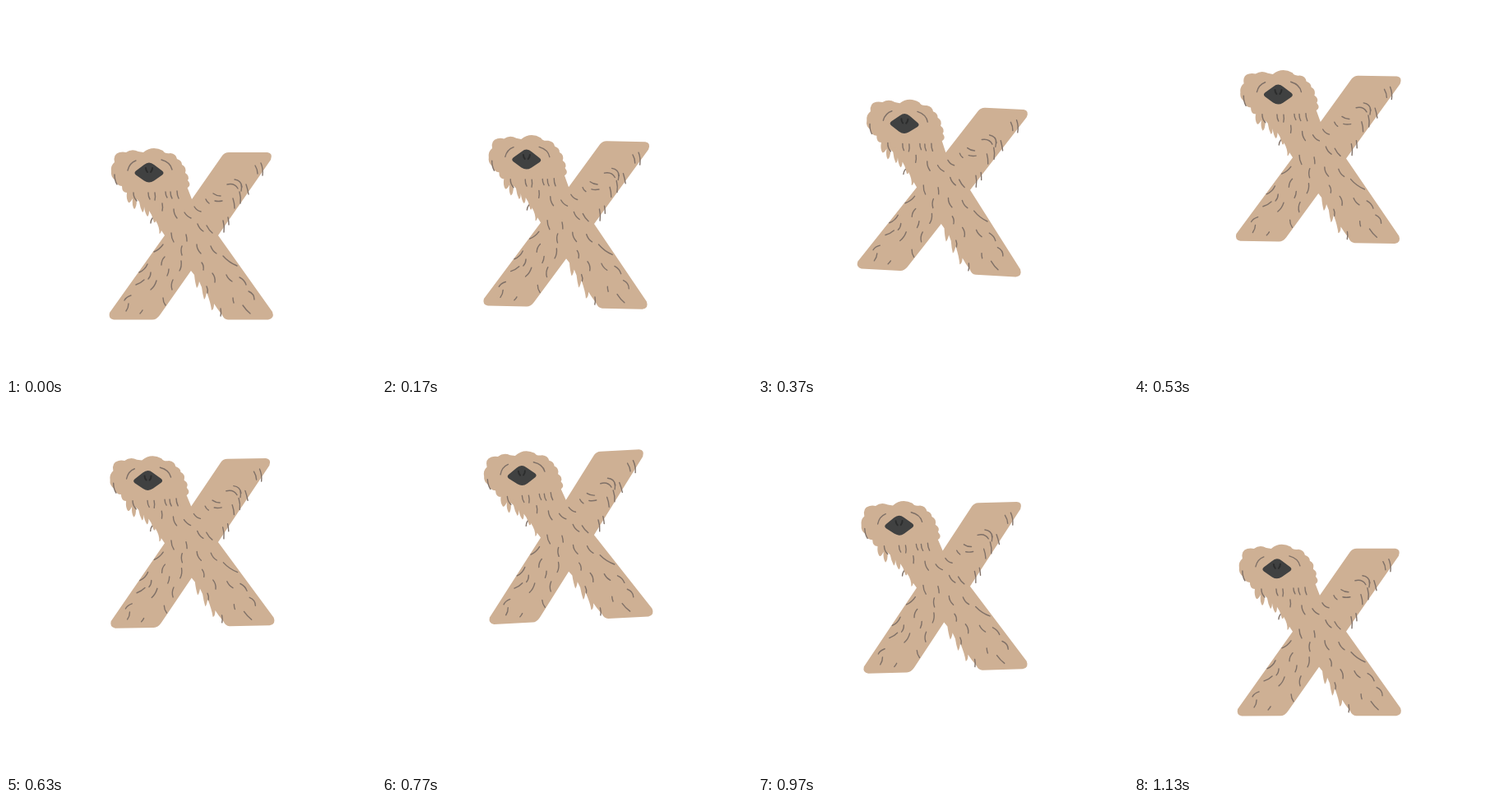
Animation, 450 px wide and 450 px high, one loop 1.16 s. Source, as an HTML page:

```html
<!DOCTYPE html>
<html lang="en">
<head>
<meta charset="utf-8">
<title>Furry X</title>
<style>
  html, body { margin: 0; height: 100%; overflow: hidden; background: #fff; }
  svg { display: block; width: 100%; height: 100%; }
  .fur { fill: none; stroke: #7f7067; stroke-width: 1.4; stroke-linecap: round; }
</style>
</head>
<body>
<svg viewBox="0 0 450 450">
  <g id="letter">
    <g fill="#ceb094">
      <!-- arm, legs and shaggy edges -->
      <path d="M226 235L263 182Q266 178 271 178H318Q325 179 322 187L258 279L324 372Q327 380 319 381.500H270Q265 381 263 376
        L257 368L253 362Q253 369 250 370Q249 361 244 348Q243 355 241 357Q239 350 238 342L235 335Q234 341 232 343
        Q230 337 229 327L225 322L187 376Q183 381.500 178 381.500H131Q124 380 126 373L193 279
        L189 273Q188 277 186.500 277Q187 269 182 261Q182 264 180 263L177 254L174 249Q174 255 172 256Q169 252 168 244Q168 250 166 251
        Q163 245 162 238L159 235Q159 245 156 247Q153 243 154 234Q151 240 149 239Q146 235 147 227L210 215L221 222Z"/>
      <!-- head -->
      <path d="M147 227Q141 227 141 219Q135 219 133 212Q127 208 128 201Q127 194 132 190Q130 180 138 178Q142 177 146 178
        Q153 173 161 177L167 178Q178 169 191 176Q193 180 200 179Q207 180 208 186Q214 188 214 193Q220 196 218 203
        Q224 207 221 212Q226 218 221 221Q219 227 210 228L180 238Z"/>
    </g>
    <g class="fur">
      <path d="M148 200q2-9 10-12M189 187q11 3 13 12M132 205q0 7 3 12M155 227q0 6 4 10M173 227q0 5 2 8M181 227q1 5 0 9
        M190 240q1 5 0 9M194 226q0 4 2 7M200 226q0 5 2 8M208 225q0 5 2 9M204 247q0 6 4 11M176 264q0-3 2-6"/>
      <path d="M217 251q3 5 8 7M229 244q3 5 8 6M243 235q1 3 4 5M233 265q2 6 7 9M244 267q3 6 7 9M201 276q0 6 3 11M219 278q1 4 1 8
        M252 228q4 3 9 3M254 237q4 1 9 0"/>
      <path d="M269 217q9-2 13 5M278 211q8 1 9 9M286 217q1 4 0 8M292 217q2 6 3 12M303 194q3 5 3 10M310 191q3 7 2 15
        M284 226q2 7 1 14M276 234q2 6 2 12M264 261q2 7 1 14M270 257q1 5 1 9"/>
      <path d="M191 290q-4 6-11 9M214 292q-2 5 0 11M193 305q-4 4-4 10M198 320q0 4-2 8M213 310q1 7-2 12M203 333q-3 6-1 12
        M172 314q-3 7-10 10M176 324q0 5-3 8M168 333q-4 4-10 6M183 334q-2 7-7 11M152 352q-6 2-8 6M149 362q0 5-3 9
        M166 370q-1 2-3 4M191 355q0 5 3 9"/>
      <path d="M232 290q0 6 5 11M249 292q2 6 7 9M264 304q7 8 17 12M238 312q3 4 2 9M251 325q4 5 3 11M268 327q2 5 7 8
        M284 330q6 3 8 9M295 347q7 3 7 10M276 355q0 3 1 6M288 364q4 6 9 10M244 341q2 4 1 8M261 368q1 5 0 9"/>
    </g>
    <path fill="#404141" d="M158 200.500L168 193Q174 188 180 193L190 200.500Q193 203 190 205.500L180 212.500Q174 216.500 168 212.500L158 205.500Q155 203 158 200.500Z"/>
    <path fill="none" stroke="#2c2d2d" stroke-width="2" stroke-linecap="round" d="M170 197q0 3 2 5M178 197q0 3-2 5"/>
  </g>
</svg>
<script>
  const LOOP = 1160, STEP = 33.33;
  const HEIGHT = [[0, 0], [22.6, -118.5], [35, 0]];
  const TILT = [[0, 0], [11, 3], [24, -3], [35, 0]];
  const letter = document.getElementById('letter');

  // Ease in and out between [step, value] keys.
  function valueAt(keys, step) {
    const i = keys.findIndex(key => key[0] > step);
    const [from, a] = keys[i - 1], [to, b] = keys[i];
    const u = (step - from) / (to - from);
    return a + (b - a) * u * u * (3 - 2 * u);
  }

  function draw() {
    const step = Math.min(34, Math.floor((performance.now() % LOOP + 3.4) / STEP));
    letter.setAttribute('transform',
      `translate(0 ${valueAt(HEIGHT, step)}) rotate(${valueAt(TILT, step)} 225 280)`);
    requestAnimationFrame(draw);
  }
  draw();
</script>
</body>
</html>
```
